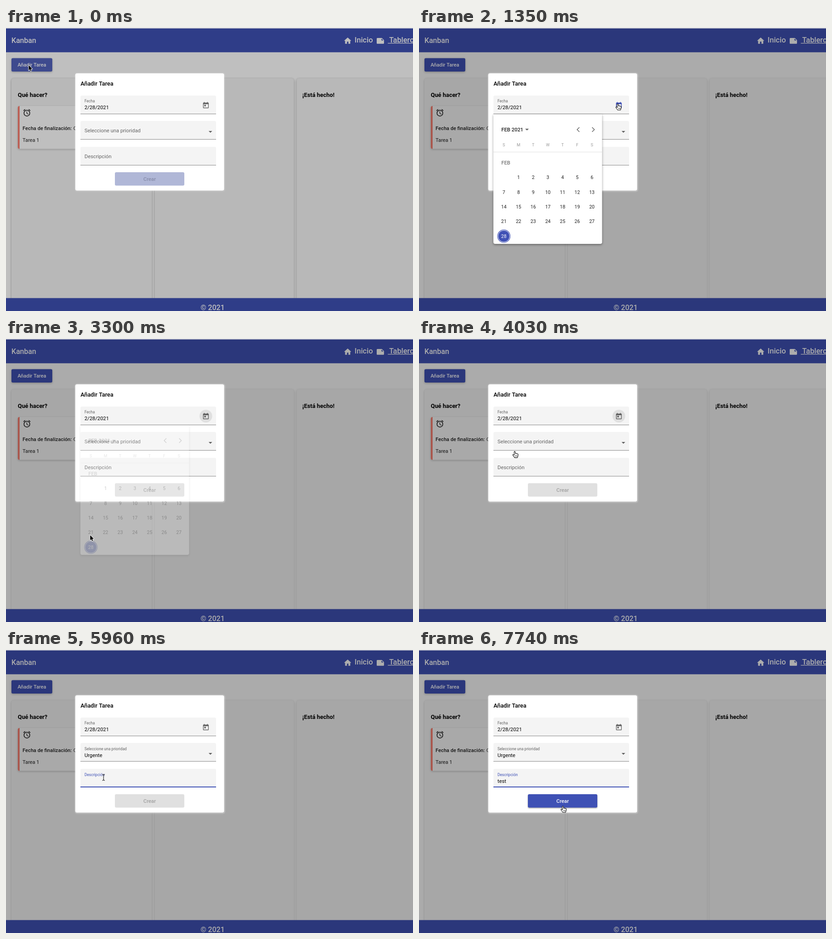
Write an HTML page with a canvas that moves like this. It is 897 px wide and 624 px high and loops after 8000 ms.

```html
<!DOCTYPE html>
<html lang="es">
<head>
<meta charset="utf-8">
<title>Kanban</title>
<style>
html, body { margin: 0; width: 897px; height: 624px; overflow: hidden; background: #adadad; }
canvas { display: block; }
</style>
</head>
<body>
<canvas id="stage" width="897" height="624"></canvas>
<script>
const W = 897, H = 624, LOOP = 8000;
const view = document.getElementById('stage').getContext('2d');
const layer = Object.assign(document.createElement('canvas'), { width: W, height: H }).getContext('2d');
let ctx = view;

const BLUE = '#3f51b5', DARK = 'rgba(0,0,0,.87)', SOFT = 'rgba(0,0,0,.6)';
const ICON = 0.805;

const icons = {
  home: 'M10 20v-6h4v6h5v-8h3L12 3 2 12h3v8z',
  note: 'M22 10l-6-6H4c-1.1 0-2 .9-2 2v12c0 1.1.9 2 2 2h16c1.1 0 2-.9 2-2v-8zm-7-4.5l5.5 5.5H15V5.5z',
  alarm: 'M22 5.72l-4.6-3.86-1.29 1.53 4.6 3.86L22 5.72zM7.88 3.39L6.6 1.86 2 5.71l1.29 1.53 4.59-3.85zM12.5 8H11v6l4.75 2.85.75-1.23-4-2.37V8zM12 4a9 9 0 1 0 0 18a9 9 0 1 0 0-18zm0 16a7 7 0 1 1 0-14a7 7 0 1 1 0 14z',
  calendar: 'M19 3h-1V1h-2v2H8V1H6v2H5c-1.1 0-2 .9-2 2v14c0 1.1.9 2 2 2h14c1.1 0 2-.9 2-2V5c0-1.1-.9-2-2-2zm0 16H5V8h14v11zM7 10h5v5H7z'
};
const arrowPath = new Path2D('M0 0V11.5L2.7 9L4.4 13L6.2 12.2L4.5 8.3H8Z');
const handPath = new Path2D('M-1.3 1.2Q0 -.7 1.3 1.2L1.6 5Q2.8 3.8 3.8 5.2Q5 4.3 5.9 5.8Q7.3 5.2 7.6 6.8L7.4 10Q6.8 12 6 14H0Q-1.5 11.8 -3.8 9Q-4.8 7.4 -3.4 6.9Q-2.2 6.9 -.8 8.4Z');

const runs = [[150, 1050, 7], [1200, 2100, 7], [2250, 3000, 6], [3300, 4330, 8],
  [4770, 5810, 8], [5960, 5960, 1], [6400, 6990, 5], [7440, 7740, 3]];
const ticks = [0];
for (const [a, b, n] of runs)
  for (let i = 0; i < n; i++) ticks.push(Math.round(a + (n > 1 ? (b - a) * i / (n - 1) : 0)));

// Pointer path: [time, x, y]
const path = [[0, 50, 82], [150, 51, 84], [300, 72, 89], [600, 300, 140], [900, 436, 166],
  [1350, 438, 167], [1650, 400, 250], [2100, 288, 424], [2400, 268.5, 429], [2700, 214, 442],
  [3000, 187, 454], [3300, 185.5, 432.5], [3450, 188, 402], [3750, 208, 262], [4040, 214, 232],
  [4330, 214, 232], [4770, 221, 260], [4920, 221, 255], [5070, 218, 243], [5220, 217, 241],
  [5660, 215, 281], [7300, 215, 281], [7440, 238, 296], [7590, 290, 330], [7740, 317, 344]];

function pointer(t) {
  let i = 0;
  while (i < path.length - 2 && path[i + 1][0] <= t) i++;
  const [a, x, y] = path[i], [b, u, v] = path[i + 1];
  const p = Math.min(1, (t - a) / (b - a));
  return [x + (u - x) * p, y + (v - y) * p];
}

// Paints a group as one flat layer so that its parts fade together
function group(alpha, paint) {
  ctx = layer;
  ctx.clearRect(0, 0, W, H);
  paint();
  ctx = view;
  ctx.globalAlpha = alpha;
  ctx.drawImage(layer.canvas, 0, 0);
  ctx.globalAlpha = 1;
}

function text(s, x, y, size, color = DARK, weight = 400, align = 'left') {
  ctx.font = `${weight} ${size}px Roboto, sans-serif`;
  ctx.textAlign = align;
  ctx.fillStyle = color;
  ctx.fillText(s, x, y);
}

function box(x, y, w, h, r, color, blur = 0, drop = 0, shade = .3) {
  ctx.save();
  if (blur) {
    ctx.shadowColor = `rgba(0,0,0,${shade})`;
    ctx.shadowBlur = blur;
    ctx.shadowOffsetY = drop;
  }
  ctx.fillStyle = color;
  ctx.beginPath();
  ctx.roundRect(x, y, w, h, r);
  ctx.fill();
  ctx.restore();
}

function circle(x, y, r, color) {
  ctx.fillStyle = color;
  ctx.beginPath();
  ctx.arc(x, y, r, 0, Math.PI * 2);
  ctx.fill();
}

function icon(name, x, y, color, scale = ICON) {
  ctx.save();
  ctx.translate(x, y);
  ctx.scale(scale, scale);
  ctx.fillStyle = color;
  ctx.fill(new Path2D(icons[name]), 'evenodd');
  ctx.restore();
}

function caretDown(x, y, color) {
  ctx.fillStyle = color;
  ctx.beginPath();
  ctx.moveTo(x - 4, y);
  ctx.lineTo(x + 4, y);
  ctx.lineTo(x, y + 4);
  ctx.fill();
}

function line(points, color, width) {
  ctx.strokeStyle = color;
  ctx.lineWidth = width;
  ctx.beginPath();
  points.forEach(([x, y]) => ctx.lineTo(x, y));
  ctx.stroke();
}

function page(t) {
  const opening = t < 150;
  ctx.fillStyle = opening ? '#fff' : '#fbfbfb';
  ctx.fillRect(0, 0, W, H);
  for (const [x, w] of [[12, 309.5], [328, 306.5], [640.5, 310]])
    box(x, 111, w, 540, 5, '#f5f5f5', 4, 1, opening ? .35 : .18);

  box(0, 1, W, 52.5, 0, BLUE);
  text('Kanban', 12, 33.3, 16.1, '#fff', 500);
  icon('home', 743.4, 18.7, '#fff');
  text('Inicio', 768.3, 32, 16.5, '#fff', 500);
  icon('note', 815.4, 18.7, '#fff');
  text('Tablero', 844.4, 32, 16.5, '#fff', 500);
  ctx.fillRect(841.5, 33, 60, 1.2);

  box(12, 66.5, 90, 29.5, 3, BLUE, 4, 1.5, .25);
  if (t < 450) box(12, 66.5, 90, 29.5, 3, `rgba(255,255,255,${opening ? .1 : .06})`);
  text('Añadir Tarea', 57, 85, 11.2, '#fff', 500, 'center');

  text('Qué hacer?', 26, 152, 12.9, '#000', 700);
  text('¡Está hecho!', 653, 152, 12.9, '#000', 700);
  box(26, 172, 282, 94.5, 4, opening ? '#fff' : '#f8f8f8', 4, 1.5, .2);
  box(26, 172, 4, 94.5, [4, 0, 0, 4], 'salmon');
  icon('alarm', 36.4, 177.2, DARK);
  text('Fecha de finalización:', 36.5, 225, 11.2, DARK, 500);
  text('Oct 1', 148.5, 225, 11.2);
  text('Tarea 1', 36.5, 251, 11.2);

  box(0, 595.5, W, 29, 0, BLUE);
  text('© 2021', 455.3, 622.3, 16.1, '#fff', 500, 'center');

  ctx.fillStyle = `rgba(0,0,0,${opening ? .25 : .32})`;
  ctx.fillRect(0, 0, W, H);
  ctx.fillStyle = '#dcdcdc';
  ctx.fillRect(0, 0, W, 1);
}

function field(y, label, value, focus) {
  const top = Math.round(y);
  box(164, top, 299, 41, [3, 3, 0, 0], '#f4f4f4');
  ctx.fillStyle = focus ? BLUE : 'rgba(0,0,0,.45)';
  ctx.fillRect(164, top + (focus ? 39 : 40), 299, focus ? 2 : 1);
  const float = value || focus;
  text(label, 173, y + (float ? 15.7 : 25), float ? 8.5 : 11.3, focus ? BLUE : SOFT);
  text(value, 173, y + 30.5, 11.3, '#000');
}

function createButton(t) {
  const on = t >= 6550;
  const color = on ? (t < 6700 ? '#8e98cf' : BLUE) : t < 150 ? '#b0b7d7' : t < 300 ? '#dadadc' : '#e0e0e0';
  box(240, 318, 153, 29.5, 3, color, on ? 3 : 0, 1.5, .35);
  text('Crear', 316.5, 336.7, 11.3, on ? '#fff' : t < 150 ? '#868caa' : '#a0a0a0', 500, 'center');
}

function dialog(t) {
  box(151, 98, 332.5, 263.5, 6, `rgba(255,255,255,${t < 150 ? .1 : .2})`);
  box(152.7, 100, 328, 258.5, 4, '#fff');
  text('Añadir Tarea', 164.3, 127, 12.8, '#000', 500);

  field(148.6, 'Fecha', '2/28/2021', false);
  if (t >= 3300 && t < 4040) circle(440.5, 170, 14, '#e0e0e0');
  icon('calendar', 432.1, 162.3, t >= 1200 && t < 3300 ? BLUE : 'rgba(0,0,0,.58)', .7);

  const picking = t >= 4150 && t < 5750;
  field(205, 'Seleccione una prioridad', t >= 5200 ? 'Urgente' : '', picking);
  caretDown(450.5, 227, picking ? BLUE : SOFT);

  const typed = 'test'.slice(0, t < 6550 ? 0 : Math.floor((t - 6550) / 146) + 1);
  const writing = t >= 5800;
  field(262, 'Descripción', typed, writing);
  if (writing && t < 5960 || t >= 6400 && t < 7440) {
    ctx.fillStyle = '#000';
    ctx.fillRect(173 + Math.round(ctx.measureText(typed).width), 282, 1, 13);
  }
  createButton(t);
}

function calendar(t, px, py) {
  ctx.save();
  if (t < 1350) {
    ctx.translate(0, 189);
    ctx.scale(1, .92);
    ctx.translate(0, -189);
  }
  box(164, 190, 239.5, 286, [0, 0, 4, 4], '#fff', 5, 2, .4);
  text('FEB 2021', 181.5, 228, 11.3, DARK, 500);
  caretDown(238, 222, SOFT);
  line([[353.5, 219], [348.5, 224], [353.5, 229]], '#666', 1.5);
  line([[381.5, 219], [386.5, 224], [381.5, 229]], '#666', 1.5);
  const colX = i => 187 + 32.35 * i, rowY = i => 329.7 + 32.35 * i;
  [...'SMTWTFS'].forEach((d, i) => text(d, colX(i), 261.3, 8.9, '#999', 400, 'center'));
  ctx.fillStyle = '#e0e0e0';
  ctx.fillRect(164, 273, 239.5, 1);
  text('FEB', 181.5, 301, 11.2, '#777', 500);

  const hoverCol = Math.floor((px - 170.8) / 32.35), hoverRow = Math.floor((py - 313.5) / 32.35);
  for (let d = 1; d <= 28; d++) {
    const col = d % 7, row = Math.floor(d / 7), x = colX(col), y = rowY(row);
    if (d === 28) {
      circle(x, y, 14.5, BLUE);
      ctx.strokeStyle = '#fff';
      ctx.lineWidth = 1;
      ctx.beginPath();
      ctx.arc(x, y, 13, 0, Math.PI * 2);
      ctx.stroke();
    } else if (t < 3300 && col === hoverCol && row === hoverRow) circle(x, y, 14.5, '#c5cae9');
    text(d, x, y + 3.7, 10.5, d === 28 ? '#fff' : DARK, 400, 'center');
  }
  ctx.restore();
}

function menu(t) {
  if (t < 4150 || t >= 5200) return;
  box(164, 213.5, 283.5, 68.5, 5, '#ebebeb', 8, 3, .4);
  const active = t < 4770 ? 0 : t < 4900 ? 1 : t < 5050 ? 2 : 1;
  const rowTop = i => 217 + 15.3 * i;
  ctx.fillStyle = '#3f8ffb';
  ctx.fillRect(164, rowTop(active), 283.5, 15.3);
  line([[169.5, 225.3], [171.7, 227.8], [176, 221.5]], active ? '#222' : '#fff', 1.2);
  ['', 'Urgente', 'Moderado', 'Bajo'].forEach((s, i) =>
    text(s, 181, rowTop(i) + 11.8, 11.6, i === active ? '#fff' : '#222'));
}

function cursor(t, x, y) {
  const beam = t >= 5650 && t < 7440;
  const hand = t >= 900 && t < 3300 || t >= 3750 && t < 5360 || t >= 7740;
  ctx.save();
  ctx.translate(x, y);
  ctx.lineJoin = 'round';
  if (beam) {
    for (const [color, width] of [['rgba(255,255,255,.7)', 2.4], ['#111', 1.1]]) {
      line([[0, -5.5], [0, 5.5]], color, width);
      line([[-2.6, -7], [0, -5.5], [2.6, -7]], color, width);
      line([[-2.6, 7], [0, 5.5], [2.6, 7]], color, width);
    }
  } else if (hand) {
    ctx.fillStyle = '#fff';
    ctx.strokeStyle = '#111';
    ctx.lineWidth = 1.1;
    ctx.fill(handPath);
    ctx.stroke(handPath);
    for (const fx of [1.7, 3.5, 5.3]) line([[fx, 8.8], [fx, 11.8]], '#111', .7);
  } else {
    ctx.strokeStyle = '#fff';
    ctx.lineWidth = 1.8;
    ctx.stroke(arrowPath);
    ctx.fillStyle = '#000';
    ctx.fill(arrowPath);
  }
  ctx.restore();
}

function draw(t) {
  const [x, y] = pointer(t);
  page(t);
  dialog(t);
  if (t >= 1200 && t < 3450)
    group(t < 1350 ? .5 : t < 3300 ? 1 : .22, () => calendar(t, x, y));
  menu(t);
  cursor(t, x, y);
}

const start = performance.now();
function loop(now) {
  const t = Math.max(0, now - start) % LOOP;
  draw(ticks.filter(k => k <= t).pop());
  requestAnimationFrame(loop);
}
draw(0);
requestAnimationFrame(loop);
</script>
</body>
</html>
```
